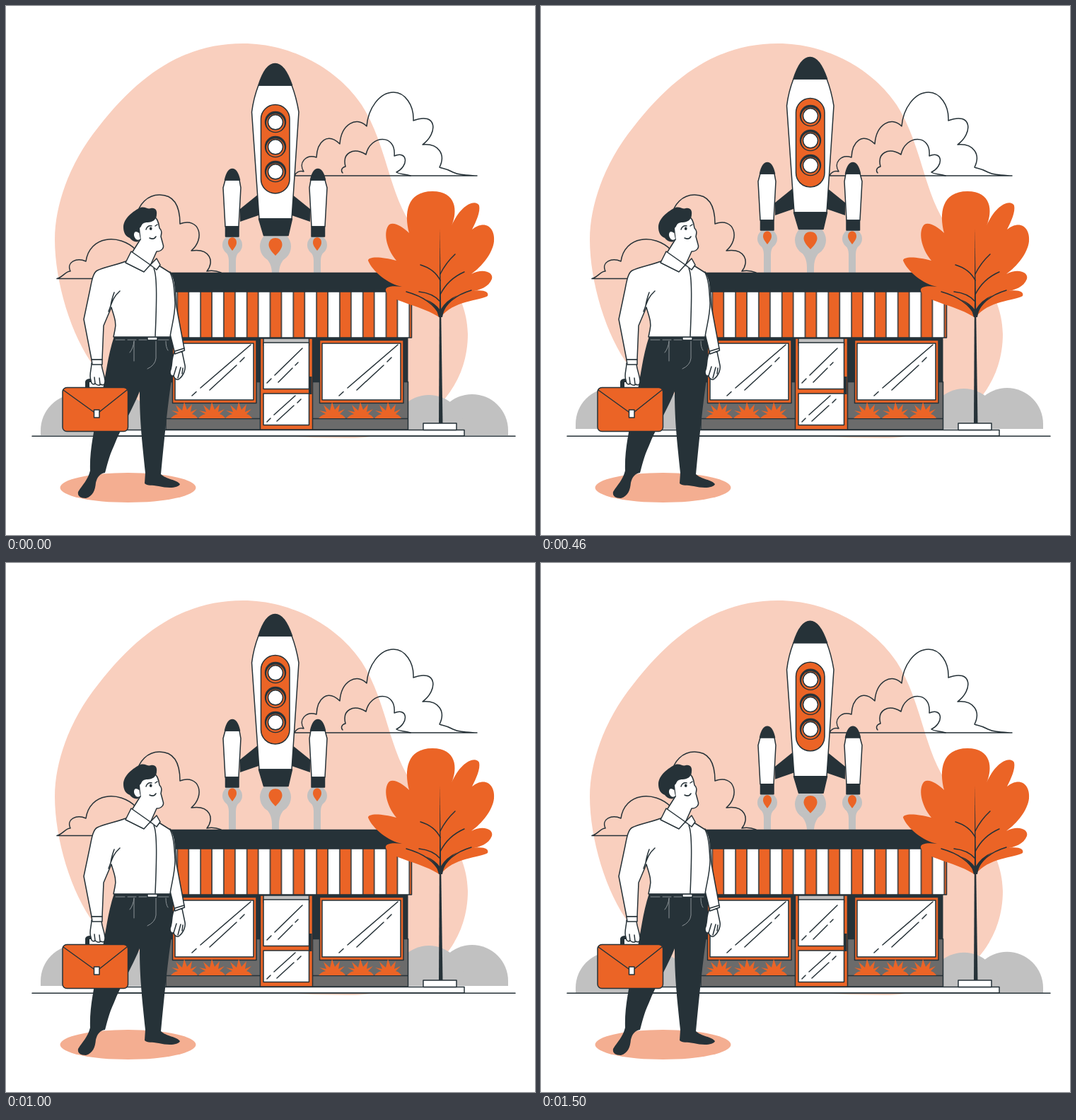
Write an HTML page that moves like this. It is 748 px wide and 748 px high and loops after 1.54 s.

```html
<!DOCTYPE html>
<html lang="en">
<head>
<meta charset="utf-8">
<title>Shop launch</title>
<style>
  html, body { margin: 0; width: 100%; height: 100%; overflow: hidden; background: #fff; }
  svg { display: block; width: 100vw; height: 100vh; stroke-linejoin: round; stroke-linecap: round; }
  .dark { fill: #263238; }
  .orange { fill: #eb6426; }
  .grey { fill: #c1c1c1; }
  .white { fill: #fff; }
  .edge, .line { stroke: #263238; stroke-width: 1.5; }
  .line { fill: none; }
  .crease { fill: none; stroke: #8b9296; stroke-width: 1; }
</style>
</head>
<body>
<svg viewBox="0 0 748 748">
  <defs>
    <pattern id="stripes" x="241.3" y="404" width="32.8" height="66" patternUnits="userSpaceOnUse">
      <rect class="white" width="33" height="66"/>
      <rect class="orange edge" x="1" y="-2" width="16" height="70"/>
    </pattern>
    <g id="booster">
      <path class="dark" d="M331 266 357 267 357 296 331 305V288L357 267Z" display="none"/>
      <path class="dark" d="M357 266 331 287V305L357 296Z"/>
      <path class="white edge" d="M310 246 307 257 310 312H329L332 257 330 246Z"/>
      <path class="dark edge" d="M309.500 246C312 235 316 230.500 320 230.500S328 235 330.500 246ZM310.500 312H329V326H310.500Z"/>
    </g>
    <g id="puff" class="grey">
      <circle cx="320" cy="338" r="14"/>
      <path d="M310 347Q315 352 315 360V410H325V360Q325 352 330 347Z"/>
    </g>
    <path id="flame" class="orange" d="M320 346C316 341 314 338 314 334.500C314 325 326 325 326 334.500C326 338 324 341 320 346Z"/>
    <g id="porthole">
      <circle class="dark" cx="381" r="15.200"/>
      <circle class="orange" cx="381" cy="1.200" r="12.800"/>
      <circle class="white edge" cx="381" cy=".3" r="10.500"/>
    </g>
    <g id="window">
      <path class="orange edge" d="M235.500 472.500H354V561.500H235.500Z"/>
      <path class="white edge" d="M239 477H350V557H239Z"/>
      <path class="line" d="M263 551 269 545.500M275 540 346 479M288 543 326 508M331 503 337 497"/>
    </g>
    <path id="plant" class="orange" d="M-19 583C-15 579-13 578-9 577L-18 572-8 574-12 564-3 572 0 560 4 571 11 563 9 574 18 570 11 577C15 578 17 580 19 583Z"/>
    <g id="bush" class="grey">
      <path d="M608 607V600A51 51 0 0 1 710 600V607Z"/>
      <path d="M548 607V600A50 50 0 0 1 648 600V607Z"/>
    </g>
  </defs>

  <path fill="#f9cfbe" d="M335 53C405 53 470 90 503 140C535 190 540 250 565 296C590 340 653 395 653 464C653 545 590 611 485 611C330 611 210 590 140 527C100 490 69 400 69 330C69 275 95 215 130 172C195 88 260 53 335 53Z"/>

  <g class="line">
    <path d="M408 240H666C650 239 640 239 632 235C622 229 617 230 613 228C622 210 612 194 589 196C611 180 610 149 576 162C577 140 564 122 548 122C528 122 512 145 510 170C496 155 474 167 472 195C454 178 440 192 439 214C424 209 413 222 421 234Q412 232 408 240"/>
    <path d="M572 240C562 237 556 238 552 235C570 226 568 204 549 212C552 180 515 182 509 210C491 199 475 208 480 227C473 229 474 234 476 236"/>
    <path d="M304 377Q294 373 284 375C295 362 289 342 262 346C282 329 274 298 246 308C246 280 236 267 217 267C200 267 188 280 184 298M184 345C160 321 118 325 113 361C100 355 85 362 91 375C84 375 81 383 72 385.500H240"/>
  </g>

  <g class="floating">
    <use href="#puff"/><use href="#puff" x="120"/>
    <circle class="grey" cx="381" cy="340" r="22"/>
    <path class="grey" d="M363 352Q376 362 376 378V410H386V378Q386 362 399 352Z"/>
    <use href="#flame"/><use href="#flame" x="120"/>
    <path class="orange" d="M381 353C375 347 371.500 342 371.500 337.500C371.500 325 390.500 325 390.500 337.500C390.500 342 387 347 381 353Z"/>
    <use href="#booster"/><use href="#booster" transform="matrix(-1 0 0 1 761 0)"/>
    <path class="white edge" d="M357 112C352 125 349 138 347.500 150L358 301H404L414 150C412 138 409 125 404 112Z"/>
    <path class="dark edge" d="M357 112C363 93 371 81.500 380.500 81.500S398 93 404.500 112ZM357.500 301H404.500L399 324.500H364.500Z"/>
    <rect class="orange edge" x="360.500" y="139.500" width="40.500" height="125.500" rx="20.200"/>
    <use href="#porthole" y="164"/><use href="#porthole" y="199"/><use href="#porthole" y="234"/>
  </g>
  <g class="floating">
    <use href="#bush"/><use href="#bush" transform="matrix(-1 0 0 1 759 0)"/>
  </g>

  <!-- Shop -->
  <path class="white edge" d="M140 599.500H648V608H140Z"/>
  <path class="dark" d="M226 469H568.500V532H226Z"/>
  <path class="edge" fill="#6b6b6b" d="M226 531.500H568.500V599H226ZM226 583.500H568.500"/>
  <path class="dark edge" d="M228 377.500H556L573 404H222Z"/>
  <path class="edge" fill="url(#stripes)" d="M222 404H573.500V469H222Z"/>
  <use href="#window"/><use href="#window" x="208"/>
  <use href="#plant" x="252"/><use href="#plant" x="291"/><use href="#plant" x="329"/>
  <use href="#plant" x="461"/><use href="#plant" x="501"/><use href="#plant" x="540"/>
  <path class="orange edge" d="M359.500 470H433.500V599H359.500Z"/>
  <path class="grey edge" d="M364 470H428.500V480H364Z"/>
  <path class="white edge" d="M364 476H428.500V541.500H364ZM364 548H428.500V592.500H364Z"/>
  <path class="line" d="M369 533 375 527M380 522 419 484M385 532 405 512M409 508 413 504M369 588 374 583M379 578 409 551M383 587 407 565M412 561 417 556"/>
  <path class="dark" d="M428 524H432.500V549H428Z"/>
  <path class="line" d="M37 608.300H720"/>

  <!-- Tree -->
  <path class="orange" d="M614 441C590 424 548 419 538 405C533 397 545 395 560 397C540 393 518 375 512 360C512 354 530 354 552 360C537 342 533 318 542 309C549 305 560 312 570 321C563 294 566 262 603 262C637 262 639 290 630 311C642 282 663 272 669 282C671 291 665 304 659 316C678 301 692 314 690 333C688 350 673 368 658 379C675 370 690 377 687 386C683 397 670 402 656 404C672 400 684 403 681 410C670 417 632 416 614 441Z"/>
  <path class="dark" d="M613.500 314 617.500 590H612Z"/>
  <g class="line" stroke-width="2">
    <path d="M614 388Q606 372 586 366M614 379Q622 363 635 351M614 418Q604 406 584 404M614 408Q625 386 648 376M614 438Q602 414 566 404M615 438Q624 412 658 402"/>
  </g>
  <path class="dark" d="M612 440Q609 424 594 415Q607 420 614 430Q622 416 638 409Q620 421 617 440Z"/>
  <path class="white edge" d="M590 590H637V599.500H590Z"/>

  <!-- Man -->
  <ellipse fill="#f4ae91" cx="172.500" cy="681" rx="96" ry="21"/>
  <path class="dark" d="M153 467H232C235 485 238 500 235 522C229 560 224 610 219 662C226 669 242 670 246 676C244 682 228 682 216 679C206 677 200 679 196 675L197 660C193 620 189 590 189 545C178 572 161 600 153 621C145 638 143 650 140 660C133 661 129 666 127 674C126 685 123 693 113 696C104 696 101 692 102 687C108 677 116 670 119 657C118 630 124 600 131 570C140 535 142 500 153 467Z"/>
  <path class="crease" d="M181 474Q180 484 175 490M181 474V502M212 474V498Q211 508 200 513M226 474Q226 483 229 487"/>
  <path class="crease" d="M155 472H168M172 472H184M188 472H200M215 472H230"/>
  <path class="white edge" d="M200 468H214V472.500H200Z"/>

  <path class="white edge" d="M238 490C233 500 236 508 232 517Q232 524 237 523Q239 529 244 528C252 522 254 513 253 508L249 489Z"/>
  <path class="line" d="M237 523 241 510M243 526 247 511M249 520 250 512"/>
  <path class="white edge" d="M232 376C241 386 239 405 241 425L252.500 487 239 492 231 460Z"/>
  <path class="line" d="M239 488 252 484"/>
  <path class="white edge" d="M175 359C158 366 139 369 129 374C123 377 121 390 119 400L110 443 121 500 136 500 138 452 149 426C152 437 157 448 154 458L152 468H232C234 453 239 438 239 420C238 405 238 389 232 377L213 365Z"/>
  <path class="line" d="M161 403C151 412 150 419 145 432M153 405Q149 416 148 424M209 371C214 382 213 420 211 467"/>

  <path class="white edge" d="M187 303 190 330 178 349 204 367 213 347C220 347 224 342 222 337L219 326C220 321 221 318 217 314C216 306 213 299 209 298Z"/>
  <path class="dark" d="M166 313C166 300 180 290 190 285C197 283 200 288 205 286C211 285 214 289 213 295C213 302 207 306 200 306C195 306 192 308 191 312Q188 313 189 320L186 319C182 317 179 321 182 328L188 333Q180 335 175 328C169 326 166 320 166 313Z"/>
  <path class="white edge" d="M188 320C180 315 178 324 183 330Q187 333 190 330"/>
  <path class="line" d="M203 328Q209 331 212 326M198 316Q200 310 206 311M211 311 214 309"/>
  <path class="dark" d="M203 314.500A1.800 1.800 0 1 1 206.500 315A1.800 1.800 0 1 1 203 314.500Z"/>
  <path class="white edge" d="M177 347 169 363 195 376 204 366ZM204 366 213 373 218 366 213 357Z"/>

  <path class="dark" d="M112 540V531Q113 527 119 527H124V532H118V540Z"/>
  <rect class="orange edge" x="80" y="539.500" width="92.500" height="62" rx="6"/>
  <path class="line" d="M81 543 124 574H132L171 543"/>
  <path class="white edge" d="M124.500 571H132V582H124.500Z"/>
  <path class="white edge" d="M121 505C121 514 117 522 120 529Q121 537 126 534Q131 538 134 535Q140 538 140 530C139 520 135 513 135 505Z"/>
  <path class="line" d="M126 534 125 525M133 535 132 526"/>
  <path class="white edge" d="M121 500H136V507H122Z"/>
</svg>
<script>
  const LOOP = 1540, STEPS = 37, TRAVEL = 15;
  const floating = document.querySelectorAll('.floating');

  // Linear rise and fall, held at 24 steps per second.
  function draw(now) {
    const step = Math.floor((now % LOOP + 5) / (1000 / 24)) % STEPS;
    const phase = (step + 1) / STEPS;
    const lift = TRAVEL * (1 - Math.abs(1 - 2 * phase));
    const y = 0.8 - lift;
    for (const part of floating) part.setAttribute('transform', `translate(0 ${y.toFixed(2)})`);
    requestAnimationFrame(draw);
  }
  draw(performance.now());
</script>
</body>
</html>
```
